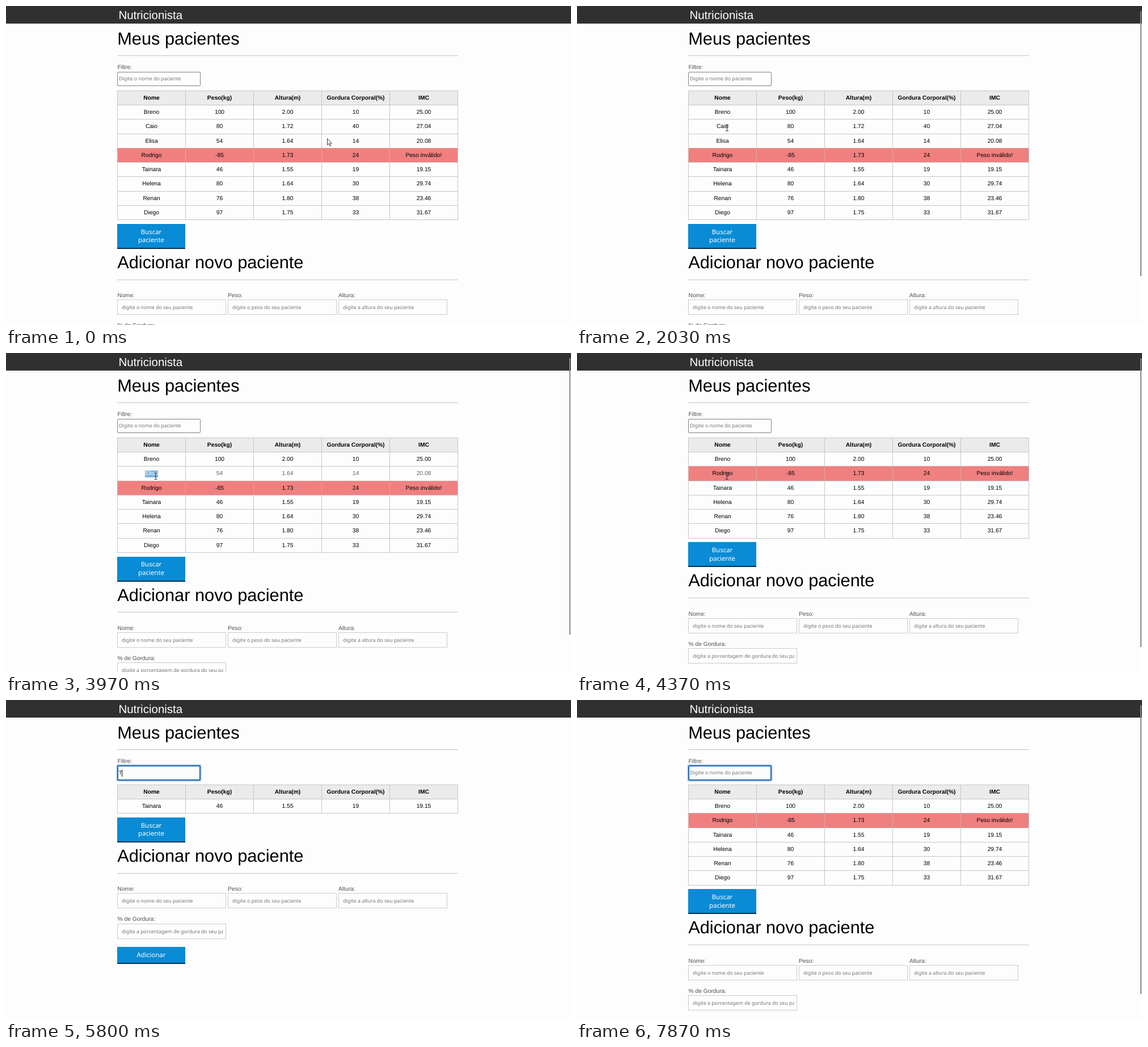
These frames come from a looping animation (996 by 562 pixels, 8 s). An HTML page:

```html
<!DOCTYPE html>
<html lang="pt-BR">
<head>
<meta charset="utf-8">
<title>Nutricionista</title>
<style>
  html, body { margin: 0; width: 100%; height: 100%; overflow: hidden; }
  body {
    position: relative; background: #fdfdfd; color: #000;
    font: 10.25px/12px "Liberation Sans", Arial, sans-serif;
    text-rendering: geometricPrecision; white-space: nowrap;
  }
  * { box-sizing: border-box; }
  header, h1, h2, hr, label, .field, .btn, .ring, .bar, .pointer { position: absolute; margin: 0; }
  header { left: 0; top: 0; width: 100%; height: 31px; background: #303030; }
  h1, h2 { font-weight: 400; line-height: 30px; }
  h1 { left: 198.4px; top: 1.5px; font-size: 20.5px; color: #fff; }
  h2 { left: 196.2px; font-size: 30.75px; }
  hr { left: 196px; width: 601px; height: 1px; border: 0; background: #c4c4c8; }
  label { left: 196.5px; color: #505050; }

  .field {
    left: 196px; width: 192px; height: 27px; border: 1px solid #ccc; padding: 0 4px 0 7px;
    font: 8.85px/26px "Noto Sans", "Open Sans", sans-serif; color: #757575;
  }
  .field span { display: block; overflow: hidden; }
  .c2 { left: 391px; }
  .c3 { left: 586px; }
  #filter { top: 116px; width: 147px; height: 25px; border-color: #808080; border-radius: 2px; padding: 0 2px; line-height: 23px; }
  .ring {
    left: 196px; top: 115px; width: 147px; height: 27px; border: 2px solid #1c62ab; border-radius: 2px;
    box-shadow: 0 0 0 2px rgba(70, 140, 220, .35);
  }
  .typed { position: absolute; left: 2px; top: 0; height: 23px; color: #000; display: flex; align-items: center; }
  .typed b { font-weight: 400; font-size: 0; }
  .typed i { width: 1px; height: 12px; background: #000; }

  #table { position: absolute; left: 196px; top: 148.9px; width: 601px; }
  .row { display: flex; height: 25.28px; overflow: hidden; border-right: 1px solid #c6c6c8; }
  .cell {
    flex: 0 0 120px; height: 25.28px; line-height: 25.8px; text-align: center;
    border: solid #c6c6c8; border-width: 1px 0 0 1px;
  }
  .cell span { display: inline-block; line-height: 12px; }
  .head { background: #ebebeb; font-weight: 700; }
  .bad { background: #f08080; }
  .bad .cell { border-color: #dda6a6; }
  #rest { position: relative; border-top: 1px solid #c6c6c8; }
  #rest > * { margin-left: -196px; margin-top: -1px; }
  .btn {
    left: 196px; width: 120px; padding-top: 7.8px; text-align: center; color: #fff;
    background: #098bd5; border-bottom: 2px solid #08304d;
    font: 11.45px/14.6px "Noto Sans", "Open Sans", sans-serif;
  }
  .bar { left: 993px; top: 9px; width: 2px; height: 467px; background: #8a8a8a; }
  .pointer { left: 0; top: 0; overflow: visible; width: 1px; height: 1px; }

  /* One loop is 8 s, so 1% is 80 ms. */
  .row, .cell span, .ring, .hint, .typed *, .bar, .pointer, .pointer g { animation: 8s step-end infinite; }

  .drop1 { animation-name: drop1; }
  .drop2 { animation-name: drop2; }
  .miss { animation-name: miss; }
  @keyframes drop1 { 38.3125%, 100% { height: 0; } }
  @keyframes drop2 { 54.4%, 100% { height: 0; } }
  @keyframes miss { 71.875% { height: 0; } 93.75%, 100% { height: 25.28px; } }

  .drop1 span { animation-name: fade1; }
  .drop2 span { animation-name: fade2; }
  .drop1 .cell:first-child span { animation-name: fade1, pick1; }
  .drop2 .cell:first-child span { animation-name: fade2, pick2; }
  @keyframes fade1 { 0% { opacity: 1; } 32% { opacity: 1; animation-timing-function: ease; } 38.25%, 100% { opacity: 0; } }
  @keyframes fade2 { 0% { opacity: 1; } 48.125% { opacity: 1; animation-timing-function: ease; } 54.375%, 100% { opacity: 0; } }
  @keyframes pick1 { 30.75%, 100% { background: #1e86d0; color: #fff; } }
  @keyframes pick2 { 47%, 100% { background: #1e86d0; color: #fff; } }

  .ring { animation-name: focus; }
  @keyframes focus { 0% { opacity: 0; } 64.625%, 100% { opacity: 1; } }
  .hint { animation-name: hint; }
  @keyframes hint { 0% { opacity: 1; } 71.875% { opacity: 0; } 93.75%, 100% { opacity: 1; } }

  .typed b:nth-child(1) { animation-name: key1; }
  .typed b:nth-child(2) { animation-name: key2; }
  .typed b:nth-child(3) { animation-name: key3; }
  .typed b:nth-child(4) { animation-name: key4; }
  @keyframes key1 { 71.875% { font-size: 8.85px; } 93.75%, 100% { font-size: 0; } }
  @keyframes key2 { 78.375% { font-size: 8.85px; } 89.125%, 100% { font-size: 0; } }
  @keyframes key3 { 79.125% { font-size: 8.85px; } 89.125%, 100% { font-size: 0; } }
  @keyframes key4 { 85% { font-size: 8.85px; } 89.125%, 100% { font-size: 0; } }
  .typed i { animation-name: caret; }
  @keyframes caret {
    0%, 75%, 89.125%, 98.375%, 100% { opacity: 0; }
    64.625%, 78.375%, 91.25% { opacity: 1; }
  }

  .bar { animation-name: bar; }
  @keyframes bar {
    0% { opacity: 0; height: 467px; }
    7.875% { opacity: 0; animation-timing-function: linear; }
    9.125% { opacity: 1; height: 467px; }
    38.3125% { height: 487px; }
    54.4% { height: 509px; }
    71.875% { opacity: 0; }
    93.75%, 100% { opacity: 1; height: 509px; }
  }

  .pointer { animation-name: move, hide; animation-timing-function: ease-in-out, step-end; }
  @keyframes move {
    0%, 7.875% { transform: translate(566px, 233px); }
    9.125%, 10.875% { transform: translate(567px, 233px); }
    12% { transform: translate(630px, 252px); animation-timing-function: linear; }
    14.625% { transform: translate(262px, 207px); animation-timing-function: ease-out; }
    16.75% { transform: translate(88px, 160px); }
    20.875% { transform: translate(270px, 222px); }
    25.375%, 38.25% { transform: translate(264.5px, 214.5px); }
    38.3125%, 57.125% { transform: translate(264px, 217px); }
    63%, 100% { transform: translate(258px, 130px); }
  }
  @keyframes hide { 0% { opacity: 1; } 71.625%, 100% { opacity: 0; } }
  .pointer .arrow { animation-name: arrow; }
  .pointer .beam { animation-name: beam; }
  @keyframes arrow {
    0%, 15%, 38.3125%, 57.6% { opacity: 1; }
    14.4%, 20.4%, 42.875%, 61.6%, 100% { opacity: 0; }
  }
  @keyframes beam {
    0%, 15%, 38.3125%, 57.6% { opacity: 0; }
    14.4%, 20.4%, 42.875%, 61.6%, 100% { opacity: 1; }
  }
</style>
</head>
<body>
<header><h1>Nutricionista</h1></header>
<h2 style="top:43px">Meus pacientes</h2>
<hr style="top:87px">
<label style="top:103px">Filtre:</label>
<div class="field" id="filter">
  <span class="hint">Digite o nome do paciente</span>
  <div class="typed"><b>T</b><b>a</b><b>i</b><b>n</b><i></i></div>
</div>
<div class="ring"></div>

<div id="table">
  <div id="rest">
    <div class="btn" style="top:7.6px;height:44px">Buscar<br>paciente</div>
    <h2 style="top:60.6px">Adicionar novo paciente</h2>
    <hr style="top:105.4px">
    <label style="top:128.8px">Nome:</label>
    <label class="c2" style="top:128.8px">Peso:</label>
    <label class="c3" style="top:128.8px">Altura:</label>
    <div class="field" style="top:141px"><span>digite o nome do seu paciente</span></div>
    <div class="field c2" style="top:141px"><span>digite o peso do seu paciente</span></div>
    <div class="field c3" style="top:141px"><span>digite a altura do seu paciente</span></div>
    <label style="top:182px">% de Gordura:</label>
    <div class="field" style="top:194.4px"><span>digite a porcentagem de gordura do seu paciente</span></div>
    <div class="btn" style="top:235.9px;height:30px">Adicionar</div>
  </div>
</div>

<div class="bar"></div>
<svg class="pointer">
  <g class="arrow"><path d="M.5 .5V11.8L3.1 9.4 5 13.6 6.7 12.8 4.9 8.8H8.2Z" fill="#fff" stroke="#222" stroke-width=".9"/></g>
  <g class="beam"><path d="M-2.5 -5.5H-.6L0 -5 .6 -5.5H2.5M0 -5V5M-2.5 5.5H-.6L0 5 .6 5.5H2.5" fill="none" stroke="#333" stroke-width="1.1"/></g>
</svg>

<script>
  const rows = [
    ['head', 'Nome', 'Peso(kg)', 'Altura(m)', 'Gordura Corporal(%)', 'IMC'],
    ['miss', 'Breno', '100', '2.00', '10', '25.00'],
    ['drop1', 'Caio', '80', '1.72', '40', '27.04'],
    ['drop2', 'Elisa', '54', '1.64', '14', '20.08'],
    ['miss bad', 'Rodrigo', '-85', '1.73', '24', 'Peso inválido!'],
    ['', 'Tainara', '46', '1.55', '19', '19.15'],
    ['miss', 'Helena', '80', '1.64', '30', '29.74'],
    ['miss', 'Renan', '76', '1.80', '38', '23.46'],
    ['miss', 'Diego', '97', '1.75', '33', '31.67'],
  ];
  const cell = text => `<div class="cell"><span>${text}</span></div>`;
  const row = ([kind, ...cells]) => `<div class="row ${kind}">${cells.map(cell).join('')}</div>`;
  document.getElementById('table').insertAdjacentHTML('afterbegin', rows.map(row).join(''));
</script>
</body>
</html>
```
